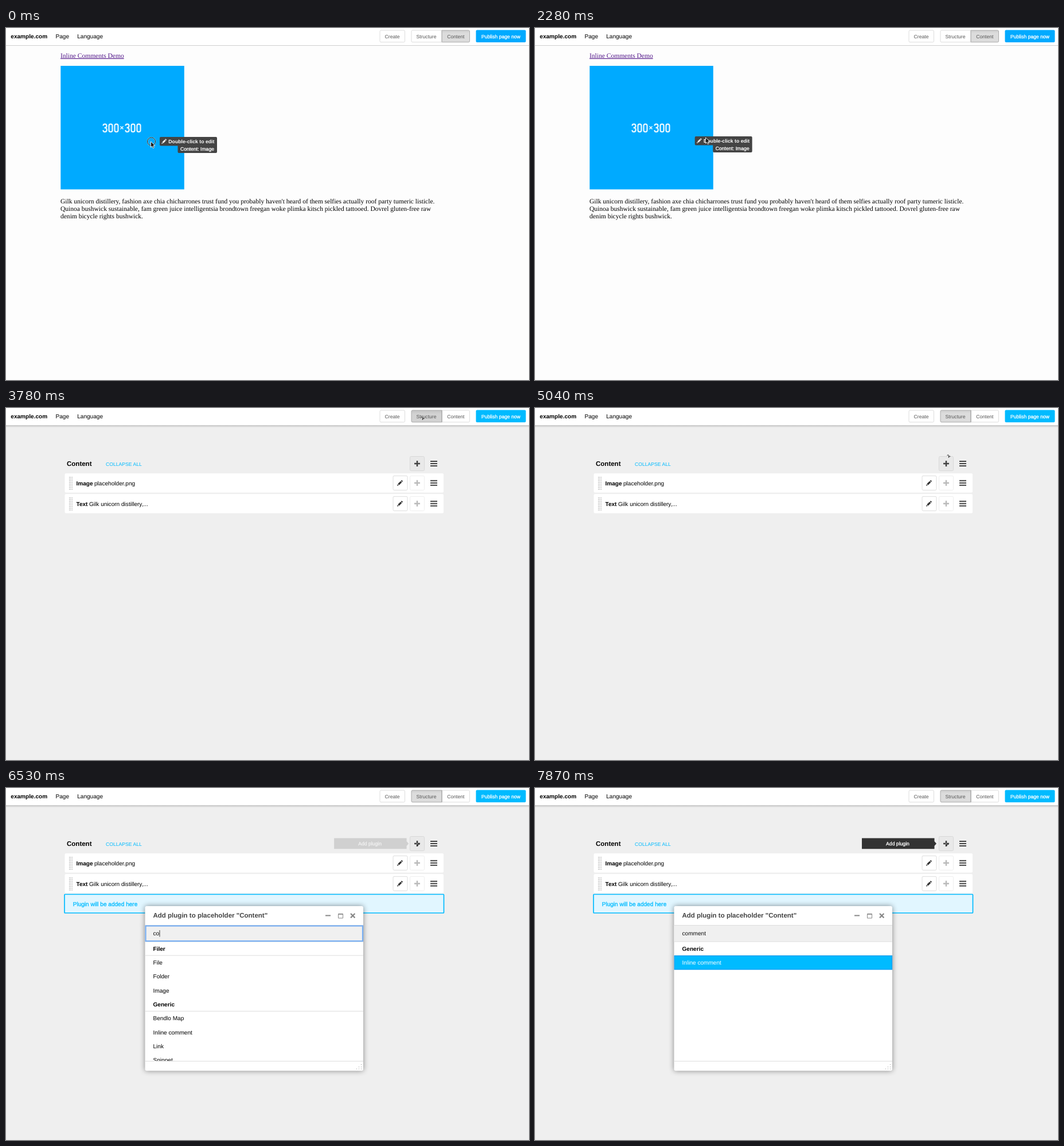
An HTML page that plays this animation: 912x614 px, repeating every 8 s.

```html
<!DOCTYPE html>
<html lang="en">
<head>
<meta charset="utf-8">
<title>Page editor</title>
<style>
html, body { margin: 0; width: 100%; height: 100%; overflow: hidden; background: #fdfdfd; }
svg { display: block; width: 912px; height: 614px; }
text { font: 10.08px "Liberation Sans", Arial, sans-serif; text-rendering: geometricPrecision; white-space: pre; }
.serif { font: 11.52px "Liberation Serif", "Times New Roman", serif; }
.s { font-size: 8.64px; }
.l { font-size: 11.52px; }
.b { font-weight: bold; }
.mid { text-anchor: middle; }
.white { fill: #fff; }
.firm { stroke: currentColor; stroke-width: .3; }
.cyan { fill: #0bf; color: #0bf; }
.grey { fill: #555; }
.btn { fill: #fff; stroke: #ddd; }
.line { fill: none; stroke: #ddd; }
#modal { filter: drop-shadow(0 0 5px rgba(0, 0, 0, .45)); }
</style>
</head>
<body>
<svg viewBox="0 0 912 614">
  <defs>
    <pattern id="dots" width="2.5" height="3" patternUnits="userSpaceOnUse">
      <rect width="1.6" height="1.7" fill="#c4c4c4"/>
    </pattern>
    <linearGradient id="pressed" x2="0" y2="1">
      <stop stop-color="#c3c3c3"/><stop offset=".3" stop-color="#d2d2d2"/><stop offset="1" stop-color="#d2d2d2"/>
    </linearGradient>
    <linearGradient id="active" x2="0" y2="1">
      <stop stop-color="#cecece"/><stop offset=".25" stop-color="#dcdcdc"/><stop offset="1" stop-color="#dcdcdc"/>
    </linearGradient>
    <linearGradient id="shade" x2="0" y2="1">
      <stop stop-color="#000" stop-opacity=".2"/><stop offset="1" stop-color="#000" stop-opacity="0"/>
    </linearGradient>
    <clipPath id="listClip"><rect x="242" y="268" width="382" height="208"/></clipPath>
    <path id="pencil" d="M0 10 .7 7.2 2.8 9.3ZM1.3 6.5 6.1 1.7 8.3 3.9 3.5 8.7ZM6.7 1.1 7.6.3Q8.2-.1 8.7.4L9.6 1.3Q10.1 1.8 9.6 2.4L8.8 3.3Z"/>
    <path id="plus" d="M-5 0H5M0-5V5" stroke-width="2.5"/>
    <path id="menu" d="M-6-4H6M-6 0H6M-6 4H6" stroke="#444" stroke-width="2"/>
  </defs>
  <rect width="912" height="614" fill="#fdfdfd"/>

  <g id="page">
    <text class="serif" x="95" y="51.8" fill="#551a8b" text-decoration="underline">Inline Comments Demo</text>
    <rect x="95.3" y="66" width="215.5" height="215.5" fill="#0af"/>
    <g id="size" fill="none" stroke="#e8f7ff" stroke-width="2.2"></g>
    <text class="serif" x="95" y="306">Gilk unicorn distillery, fashion axe chia chicharrones trust fund you probably haven't heard of them selfies actually roof party tumeric listicle.</text>
    <text class="serif" x="95" y="319">Quinoa bushwick sustainable, fam green juice intelligentsia brondtown freegan woke plimka kitsch pickled tattooed. Dovrel gluten-free raw</text>
    <text class="serif" x="95" y="332">denim bicycle rights bushwick.</text>
    <g id="hint">
      <path d="M270 190H366Q368 190 368 192V216Q368 218 366 218H301.500Q299.500 218 299.500 216V205.500H270Q268 205.500 268 203.500V192Q268 190 270 190Z" fill="#444"/>
      <use href="#pencil" transform="translate(271.300 193.300) scale(.88)" fill="#eee"/>
      <text class="b white" style="font-size:8.7px" x="283.300" y="200.700">Double-click to edit</text>
      <text class="s white firm" color="#fff" x="304" y="213.600">Content: Image</text>
    </g>
  </g>

  <g id="structure">
    <rect width="912" height="614" fill="#efefef"/>
    <text class="l b" x="106" y="101">Content</text>
    <text class="s cyan" x="174" y="100.500">COLLAPSE ALL</text>
    <rect x="704.500" y="84.500" width="25" height="25" rx="2" fill="#e9e9e9" stroke="#d8d8d8"/>
    <use href="#plus" x="717" y="97" stroke="#444"/>
    <use href="#menu" x="746" y="97"/>
    <g id="rows"></g>
    <g id="drop">
      <rect x="102" y="185.500" width="661.500" height="32.500" rx="1" fill="#e1f6ff" stroke="#0bf" stroke-width="1.700"/>
      <text class="cyan firm" x="116.700" y="205.600">Plugin will be added here</text>
    </g>
    <g id="tip">
      <path d="M570 87.500H696.500V93L700 97 696.500 101V106.300H570Z" fill="#333"/>
      <text class="s white mid firm" color="#fff" x="632.500" y="100">Add plugin</text>
    </g>
    <g id="modal">
      <rect x="242.500" y="206" width="380.500" height="287.300" rx="3" fill="#fff"/>
      <text class="l b" x="256.500" y="226.400" fill="#444">Add plugin to placeholder "Content"</text>
      <g fill="none" stroke="#888">
        <path d="M557 222.500H566" stroke-width="2"/>
        <path d="M579.500 219.500H587.500V227H579.500ZM579.500 220.300H587.500"/>
        <path d="M601 219 608.400 226.400M608.400 219 601 226.400" stroke-width="2.300"/>
      </g>
      <rect x="242.500" y="239.500" width="380.500" height="28.500" fill="#f0f0f0"/>
      <path class="line" d="M242.500 239.500H623M242.500 268H623"/>
      <rect id="focus" x="243.500" y="240.500" width="378.500" height="26.500" fill="none" stroke="#77aef2" stroke-width="2.200"/>
      <text id="query" x="256.500" y="257"></text>
      <path id="caret" d="M0 248V259.500" stroke="#222" stroke-width=".9"/>
      <g id="full" clip-path="url(#listClip)"></g>
      <g id="found"></g>
      <path class="line" d="M242.500 476.500H623"/>
      <path d="M619 482h1v1h-1zM615 486h1v1h-1zM619 486h1v1h-1zM611 489.500h1v1h-1zM615 489.500h1v1h-1zM619 489.500h1v1h-1z" fill="#999"/>
    </g>
  </g>

  <g id="bar">
    <rect id="barShade" y="30" width="912" height="4" fill="url(#shade)"/>
    <rect width="912" height="30" fill="#fff"/>
    <path id="barLine" d="M0 30.500H912" stroke="#cfcfcf"/>
    <text class="b" x="8.300" y="18">example.com</text>
    <text x="86.500" y="18">Page</text>
    <text x="124.200" y="18">Language</text>
    <rect class="btn" x="652" y="4" width="43.500" height="20.700" rx="2"/>
    <text class="s mid grey" x="673.500" y="18">Create</text>
    <path id="contentBtn" d="M760 4H806.500Q808.500 4 808.500 6V22.700Q808.500 24.700 806.500 24.700H760Z"/>
    <path id="structBtn" d="M760 4H709Q707 4 707 6V22.700Q707 24.700 709 24.700H760Z"/>
    <path id="edge" d="M760 4V24.700"/>
    <text class="s mid grey" x="733" y="18">Structure</text>
    <text class="s mid grey" x="784.300" y="18">Content</text>
    <rect id="publish" x="819.500" y="3.500" width="87" height="21.500" rx="2"/>
    <text class="s mid white firm" color="#fff" x="863" y="18">Publish page now</text>
  </g>

  <g id="pointer">
    <g id="ring" fill="none">
      <circle cx="1" cy="0" r="7" stroke="#fff" stroke-opacity=".5" stroke-width="2"/>
      <circle cx="1" cy="0" r="7" stroke="#222" stroke-width="1"/>
    </g>
    <path id="arrow" d="M0 0V10.200L2.300 8.100 3.800 11.600 5.700 10.800 4.200 7.300H7.300Z" fill="#111" stroke="#fff" stroke-width=".9"/>
    <path id="hand" d="M-1 1.200Q-1-.2.200-.2 1.400-.2 1.400 1.200V4.500Q3-.2+4 3.200 4.700 5Q6.300 4.200 6.400 5.800 8 5.300 8 7V9Q8 10.500 6.800 12H.8Q-.5 10-2.800 7.500-3.600 6-2.400 5.900-1.600 6-1 7Z" fill="#fff" stroke="#222" stroke-width="1"/>
  </g>
</svg>
<script>
const LOOP = 8000;
const $ = id => document.getElementById(id);
const show = (id, on) => $(id).setAttribute('visibility', on ? 'inherit' : 'hidden');
const paint = (id, fill, stroke) => { $(id).style.fill = fill; if (stroke) $(id).style.stroke = stroke; };
const label = (x, y, str, cls = '') => `<text class="${cls}" x="${x}" y="${y}">${str}</text>`;

// condensed caption of the placeholder picture
const three = x => `<path d="M${x + 1} 170.500Q${x + 1} 167.600 ${x + 4} 167.600T${x + 7} 170.800Q${x + 7} 174 ${x + 3} 174Q${x + 7.200} 174 ${x + 7.200} 177.500T${x + 4} 181.200 ${x + 1} 178"/>`;
const zero = x => `<rect x="${x + 1}" y="167.600" width="6" height="13.600" rx="3"/>`;
$('size').innerHTML = [168.500, 207.500].map(x => three(x) + zero(x + 10) + zero(x + 20)).join('') +
  '<path d="M199.500 171.500 204.500 176.500M204.500 171.500 199.500 176.500" stroke-width="1.600"/>';

const row = (y, kind, x, name) => `
  <rect x="102.500" y="${y}" width="660.500" height="33.500" rx="2" fill="#fff"/>
  <rect x="109.500" y="${y + 5}" width="7" height="24" fill="url(#dots)"/>
  ${label(122.500, y + 20.500, kind, 'b')}${label(x, y + 20.500, name)}
  <rect class="btn" x="675" y="${y + 4.300}" width="25" height="25" rx="2"/>
  <use href="#pencil" x="682" y="${y + 11.800}" fill="#333"/>
  <rect class="btn" x="704.500" y="${y + 4.300}" width="25" height="25" rx="2" style="stroke:#eee"/>
  <use href="#plus" x="717" y="${y + 16.800}" stroke="#bbb"/>
  <use href="#menu" x="746" y="${y + 16.800}"/>`;
$('rows').innerHTML = row(114, 'Image', 154, 'placeholder.png') +
  row(150, 'Text', 145, 'Gilk unicorn distillery,...');

const heading = (y, str) => label(256.500, y, str, 'b') + `<path class="line" d="M242.500 ${y + 8.300}H623"/>`;
const plugins = ['#Filer', 'File', 'Folder', 'Image', '#Generic', 'Bendlo Map', 'Inline comment', 'Link', 'Snippet'];
$('full').innerHTML = plugins.map((p, i) => {
  const y = 283.800 + i * 24.300;
  return p[0] === '#' ? heading(y, p.slice(1)) : label(256.500, y, p);
}).join('');
$('found').innerHTML = heading(283.800, 'Generic') +
  '<rect id="pick" x="243.300" y="292.800" width="379" height="23.600" fill="#0bf" stroke="#14a5f5" stroke-width="1.600"/>' +
  '<text id="match" x="256.500" y="308.100">Inline comment</text>';

// time, x, y of the pointer hot spot
const moves = [
  [0, 252.500, 198], [2280, 297.500, 191], [2430, 385, 160], [2580, 500, 115], [2730, 600, 74],
  [2880, 672, 42], [3030, 714, 33], [3180, 725, 16], [4380, 726, 23], [4530, 726, 36], [4680, 725, 52],
  [4840, 723, 68], [5000, 720, 82], [5160, 718, 91], [5330, 716.700, 96]
];
const word = 'comment';
const carets = [...word].map((_, i) => word.slice(0, i + 1));

function render(t) {
  const within = (a, b) => t >= a && t < b;
  const [, x, y] = moves.filter(m => m[0] <= t).pop();
  const structure = t >= 3780, open = t >= 5480;

  show('page', !structure);
  show('structure', structure);
  show('barShade', structure);
  show('barLine', !structure);
  paint('publish', structure ? '#0bf' : '#0af');

  const overStruct = within(3180, 4530);
  if (structure) paint('structBtn', overStruct ? 'url(#pressed)' : 'url(#active)', '#aaa');
  else if (t >= 3630) paint('structBtn', 'url(#pressed)', '#aaa');
  else paint('structBtn', overStruct ? '#f8f8f8' : '#fff', '#ddd');
  if (structure) paint('contentBtn', '#fff', '#ddd');
  else if (t >= 3630) paint('contentBtn', '#e4e4e4', '#c6c6c6');
  else paint('contentBtn', 'url(#active)', '#aaa');
  $('edge').style.stroke = '#aaa';

  const hand = overStruct || t >= 5000;
  $('pointer').setAttribute('transform', `translate(${x} ${y})`);
  show('arrow', !hand);
  show('hand', hand);
  show('ring', t < 150 || within(3630, 3780) || within(5330, 5480));
  show('hint', t < 2430);
  $('hint').setAttribute('transform', t < 2280 ? '' : 'translate(10.700 -1)');

  show('drop', open);
  show('modal', open);
  const grown = t >= 5630;
  $('modal').setAttribute('transform', grown ? '' : 'translate(432.700 349.600) scale(.875) translate(-432.700 -349.600)');

  const fade = t < 6530 ? 0 : t < 6678 ? .16 : t < 6826 ? .7 : 1;
  $('tip').setAttribute('opacity', fade);
  $('tip').setAttribute('transform', `translate(${2.500 * (1 - fade)} 0)`);

  const typed = t < 6530 ? '' : carets[Math.min(word.length - 1, 1 + Math.floor((t - 6530) / 148))];
  const query = $('query'), str = typed || 'Filter plugins...';
  if (query.textContent !== str) query.textContent = str;
  query.style.fill = typed ? '#111' : '#aaa';

  const picked = t >= 7870;
  show('focus', grown && !picked);
  show('caret', within(5630, 6080) || within(6530, 7870));
  const caretX = 257.300 + (typed ? query.getComputedTextLength() : 0);
  $('caret').setAttribute('transform', `translate(${caretX} 0)`);
  const filtered = t >= 6678;
  show('full', !filtered);
  show('found', filtered);
  show('pick', filtered && picked);
  // hidden ancestors must win over these two
  if (!filtered) $('pick').setAttribute('visibility', 'inherit');
  $('match').style.fill = picked ? '#fff' : '#000';
}

const start = performance.now();
function tick() {
  render((performance.now() - start) % LOOP);
  requestAnimationFrame(tick);
}
render(0);
requestAnimationFrame(tick);
</script>
</body>
</html>
```
